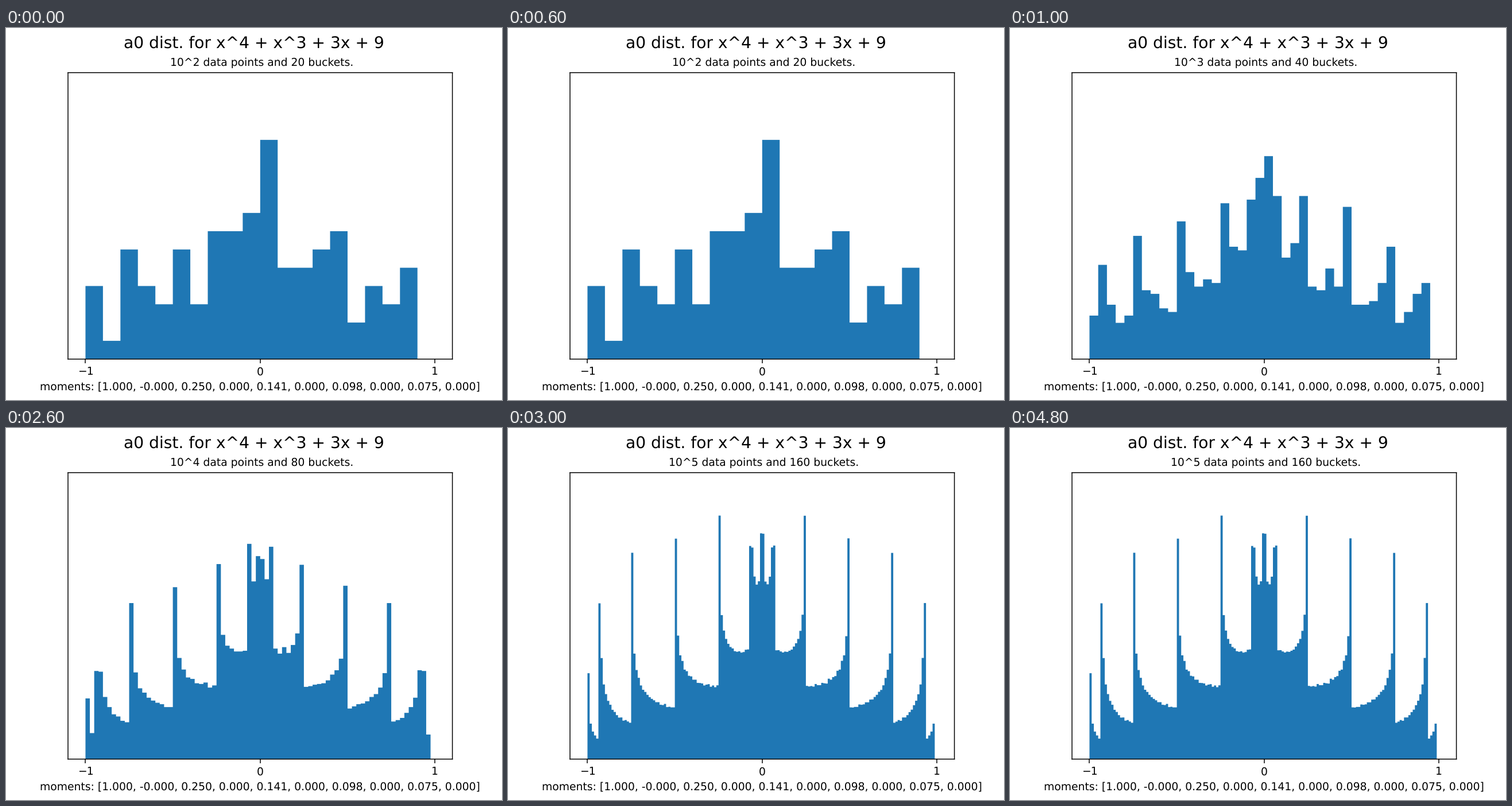
Write a matplotlib script that moves like this. It is 864x648 px and loops after 6 s.

```python
import numpy as np
import matplotlib.pyplot as plt
from matplotlib.animation import FuncAnimation

plt.rcParams.update({
    "font.family": "DejaVu Sans",
    "text.hinting": "none",  # even letter spacing and soft, unsnapped edges
    "path.snap": False,
})

FRAMES = 6
MAX_POWER = 5

# Arguments of the roots: with t = x + 3/x the quartic becomes (t - 2)(t + 3).
ANGLES = [np.arccos(t / (2 * np.sqrt(3))) for t in (2, -3)]


def normalized_traces(power):
    n = np.arange(1, 10**power + 1)
    return sum(np.cos(n * angle) for angle in ANGLES) / 2


def moments_label(data, count=10):
    moments = (np.mean(data**k) for k in range(count))
    return "moments: [" + ", ".join(f"{m:.3f}" for m in moments) + "]"


fig, ax = plt.subplots(figsize=(6.4, 4.8), dpi=135)
fig.suptitle("a0 dist. for x^4 + x^3 + 3x + 9", fontsize=15)
label = moments_label(normalized_traces(MAX_POWER))


def draw(frame):
    power = min(2 + frame, MAX_POWER)
    buckets = 5 * 2**power
    edges = -1 + 2 / buckets * np.arange(buckets)
    ax.clear()
    ax.hist(normalized_traces(power), bins=edges, density=True,
            histtype="stepfilled", color="#1f77b4")
    ax.set(xlim=(-1.1, 1.1), ylim=(0, 1.6), xticks=[-1, 0, 1], yticks=[])
    ax.set_title(f" 10^{power} data points and {buckets} buckets.", fontsize=10)
    ax.set_xlabel(label, fontsize=10)


animation = FuncAnimation(fig, draw, frames=FRAMES, init_func=lambda: None,
                          interval=1000, repeat=True, repeat_delay=0)
plt.show()
```
